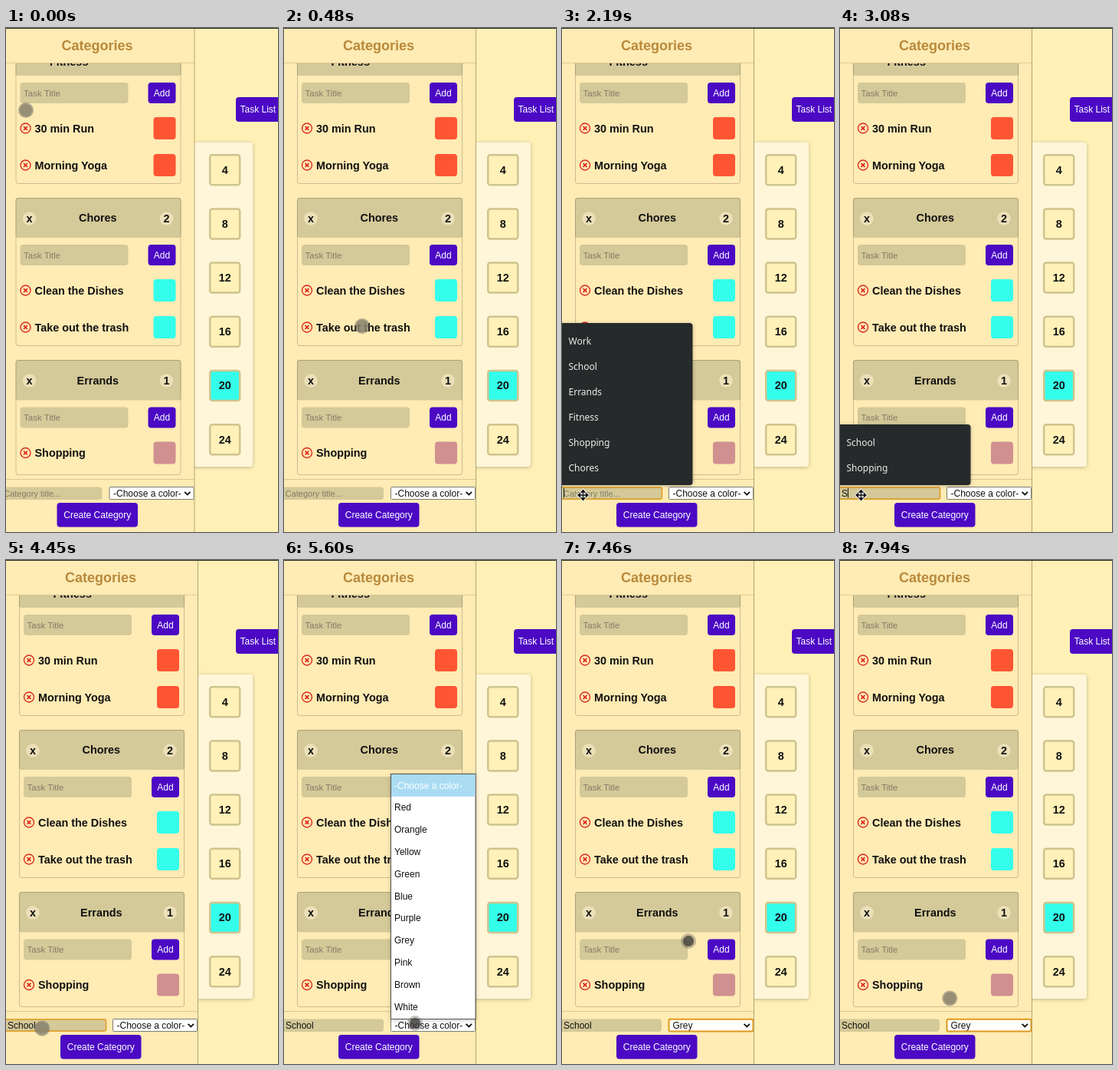
Recreate the animation shown at these times as an HTML page. Size 355 px wide and 656 px high, loop 8 s.

```html
<!DOCTYPE html>
<html lang="en">
<head>
<meta charset="utf-8">
<title>Categories</title>
<style>
  html, body { margin: 0; width: 100%; height: 100%; overflow: hidden; background: #fff0b6; }
  svg { display: block; width: 355px; height: 656px; }
  text { font: 12px "Liberation Sans", Arial, sans-serif; fill: #111; white-space: pre; }
  .bold { font-size: 14.4px; font-weight: bold; }
  .title { font-size: 18px; font-weight: bold; fill: #b8893b; }
  .light { fill: #fff; }
  .hint { font-size: 11.5px; fill: #827c68; }
  .small { font-size: 11px; }
  .mid { text-anchor: middle; }
  .suggest { font: 500 12px "Noto Sans", "Open Sans", sans-serif; fill: #eee; }
</style>
</head>
<body>
<svg id="stage" viewBox="0 0 355 656" xmlns="http://www.w3.org/2000/svg">
  <defs>
    <filter id="soft" x="-20%" y="-20%" width="140%" height="140%">
      <feDropShadow dx="0" dy="1" stdDeviation="2.5" flood-color="#000" flood-opacity=".25"/>
    </filter>
  </defs>
</svg>
<script>
const LOOP = 8000;
const TAN = '#d4c998', PANEL = '#ffebb4', VIOLET = '#4b09c4', CYAN = '#33ffea', FOCUS = '#e09a1c';
const stage = document.getElementById('stage');

function add(parent, tag, attrs, content) {
  const el = document.createElementNS('http://www.w3.org/2000/svg', tag);
  for (const k in attrs) el.setAttribute(k, attrs[k]);
  if (content !== undefined) el.textContent = content;
  parent.appendChild(el);
  return el;
}
const group = (parent, attrs) => add(parent, 'g', attrs || {});
const box = (parent, x, y, width, height, fill, rx = 0, extra = {}) =>
  add(parent, 'rect', { x, y, width, height, fill, rx, ...extra });
const label = (parent, x, y, content, cls = '') =>
  add(parent, 'text', { x, y, class: cls }, content);
const show = (el, on) => el.setAttribute('visibility', on ? 'visible' : 'hidden');

function button(parent, x, y, w, h, content) {
  box(parent, x, y, w, h, VIOLET, 4);
  label(parent, x + w / 2, y + h / 2 + 4.3, content, 'light mid');
}

// Page behind the panel
box(stage, 0, 0, 355, 656, '#fff0b6');
box(stage, 200, 149, 122, 422, '#fff6d9', 4, { filter: 'url(#soft)' });
for (let i = 0; i < 6; i++) {
  const y = 164 + i * 70.2, hour = 4 + i * 4;
  box(stage, 266.2, y + 1.2, 39, 39, hour === 20 ? CYAN : '#fff1b8', 3,
    { stroke: '#cfc48e', 'stroke-width': 2.5 });
  label(stage, 285.7, y + 25.5, hour, 'bold mid');
}
box(stage, 300, 90, 70, 32, VIOLET, 4);
label(stage, 305.5, 110.3, 'Task List', 'light');

// Sliding panel
const panel = group(stage);
box(panel, -10, 0, 260, 656, PANEL);

function badge(x, y, content) {
  add(panel, 'circle', { cx: x, cy: y, r: 8.8, fill: '#ebe0b8' });
  label(panel, x, y + 5, content, 'bold mid');
}

function card(top, headEnd, name, nameX, nameY, tasks, color) {
  const bottom = headEnd + 45 + tasks.length * 48 + (tasks.length === 2 ? 0 : 4.5);
  box(panel, 17, top, 216, headEnd - top, TAN, 3);
  box(panel, 17.5, top + .5, 215, bottom - top - 1, 'none', 3, { stroke: '#000', 'stroke-opacity': .2 });
  label(panel, nameX, nameY, name, 'bold mid');
  box(panel, 23, headEnd + 9, 141, 27, TAN, 4);
  label(panel, 27.5, headEnd + 26.7, 'Task Title', 'hint');
  button(panel, 190, headEnd + 9, 36, 27, 'Add');
  tasks.forEach((task, i) => {
    const y = headEnd + 68.5 + i * 48;
    const icon = group(panel, { transform: `translate(30 ${y})`, fill: 'none', stroke: '#dc2a1c', 'stroke-width': 1.4 });
    add(icon, 'circle', { r: 6.5 });
    add(icon, 'path', { d: 'M-2.4 -2.4L2.4 2.4M2.4 -2.4L-2.4 2.4', 'stroke-width': 1.7 });
    label(panel, 42, y + 5, task, 'bold');
    box(panel, 197, y - 14.5, 29, 29, color, 4);
  });
}

card(20, 62, 'Fitness', 86.7, 48.5, ['30 min Run', 'Morning Yoga'], '#ff5533');
card(221, 273, 'Chores', 124.3, 252.3, ['Clean the Dishes', 'Take out the trash'], CYAN);
card(432, 484.5, 'Errands', 124.3, 463.5, ['Shopping'], '#d09090');
[[248, 2], [459, 1]].forEach(([y, n]) => { badge(35, y, 'x'); badge(214, y, n); });

box(panel, -10, 0, 260, 45, PANEL);
box(panel, -10, 45, 260, 1, '#e0cc94');
label(panel, 123.5, 29, 'Categories', 'title mid');
box(panel, -10, 587, 260, 1, '#d9c791');

const field = box(panel, -10, 597.5, 140, 16.5, TAN, 4);
const fieldRing = box(panel, -10, 598, 140.5, 15, 'none', 2, { stroke: FOCUS, 'stroke-width': 1.5 });
const hint = label(panel, 1.7, 609.5, 'Category title...', 'hint small');
const typed = label(panel, 2, 609.5, '');
const caret = box(panel, 2, 599, 1, 12.5, '#111');

box(panel, 139.5, 597.5, 110, 16, '#fff', 1, { stroke: '#7d7a70' });
const choice = label(panel, 144.5, 609.8, '');
add(panel, 'path', { d: 'M237.6 603.8l3.7 3.7l3.7 -3.7', fill: 'none', stroke: '#111', 'stroke-width': 1.8 });
const choiceRing = box(panel, 139.5, 597.8, 110, 15.6, 'none', 2, { stroke: FOCUS, 'stroke-width': 2 });
button(panel, 71, 618, 105.5, 31.5, 'Create Category');
box(panel, 250, 0, 1, 656, '#b5a46f');
box(stage, 0, 0, 355, 1, '#2a2820');

// Autofill suggestions
const history = ['Work', 'School', 'Errands', 'Fitness', 'Shopping', 'Chores'];
const hints = group(stage);
const hintsBox = box(hints, -8, 0, 178.5, 0, '#28292b', 4, { filter: 'url(#soft)' });
const hintRows = history.map(() => label(hints, 8.5, 0, '', 'suggest'));

function drawHints(text) {
  const found = history.filter(w => w.startsWith(text));
  const height = 13 + 33 * found.length;
  const top = found.length > 1 ? 595 - height : 614;
  hintsBox.setAttribute('y', top);
  hintsBox.setAttribute('height', height);
  hintRows.forEach((row, i) => {
    row.textContent = found[i] || '';
    row.setAttribute('y', top + 27.5 + 33 * i);
  });
}

// Colour list
const list = group(stage);
box(list, 139.5, 278.5, 110.5, 319, '#fff', 0, { stroke: '#555', filter: 'url(#soft)' });
box(list, 140, 279, 109.5, 28.8, '#a9dcf3');
['-Choose a color-', 'Red', 'Orangle', 'Yellow', 'Green', 'Blue', 'Purple', 'Grey', 'Pink', 'Brown', 'White']
  .forEach((name, i) => label(list, 144, 297.6 + i * 28.8, name, i ? '' : 'light'));

// Pointer: a round dot, or a four-way arrow over the text field
const pointer = group(stage);
const dot = group(pointer);
const halo = add(dot, 'circle', { r: 10, fill: '#555' });
const core = add(dot, 'circle', { r: 8, fill: '#666' });
const cross = group(pointer);
const arrows = 'M-4 0H4M0 -4V4M-6.5 0l2.5 -2.3v4.6zM6.5 0l-2.5 -2.3v4.6zM0 -6.5l-2.3 2.5h4.6zM0 6.5l-2.3 -2.5h4.6z';
add(cross, 'path', { d: arrows, fill: '#fff', stroke: '#fff', 'stroke-width': 3 });
add(cross, 'path', { d: arrows, fill: '#111', stroke: '#111', 'stroke-width': 1.3 });

const within = (t, a, b) => t >= a && t < b;
const mix = (a, b, p) => a + (b - a) * p;

// Progress 0..1 made of n jumps, the first at a and the last at b
function jumps(t, a, b, n) {
  if (t < a) return 0;
  if (t >= b) return 1;
  return (Math.floor((t - a) / (b - a) * (n - 1) + 1e-6) + 1) / n;
}

function pointerAt(t) {
  if (t < 1050) {
    const p = jumps(t, 90, 480, 5);
    return [mix(26, 102, p), mix(107, 388, p)];
  }
  if (t < 4450) {
    const p = jumps(t, 1050, 1810, 9), e = p * p * (3 - 2 * p);
    return [mix(102, 27.5, e), mix(388, 608, e)];
  }
  if (t < 6510) {
    const p = jumps(t, 4450, 5110, 8);
    return [mix(28, 171, p) + 3 * Math.sin(Math.PI * p), mix(608, 603, p) + 6 * Math.sin(Math.PI * p)];
  }
  if (t < 7540) {
    const p = jumps(t, 6510, 7260, 9);
    return [mix(171, 165, p) + 6 * Math.sin(Math.PI * p), mix(603, 496, 1 - (1 - p) ** 2)];
  }
  if (t < 7850) return [156, 487];
  return t < 7940 ? [149, 532] : [143.3, 570.5];
}

const keyTimes = [3080, 3180, 3470, 3560, 3760, 3960];

function render(t) {
  const slide = t < 90 ? -4.5 : t < 190 ? -1 : 0;
  panel.setAttribute('transform', `translate(${slide} 0)`);

  const text = 'School'.slice(0, keyTimes.filter(k => t >= k).length);
  const focused = within(t, 2190, 5600);
  typed.textContent = text;
  show(hint, !text);
  show(fieldRing, focused);
  caret.setAttribute('x', text ? 2 + typed.getComputedTextLength() : 2);
  show(caret, within(t, 2190, 2700) || within(t, 3080, 4450) || within(t, 4950, 5420));

  drawHints(text);
  hints.setAttribute('display', within(t, 2190, 3960) ? 'inline' : 'none');
  list.setAttribute('display', within(t, 5600, 7460) ? 'inline' : 'none');
  choice.textContent = t < 7460 ? '-Choose a color-' : 'Grey';
  show(choiceRing, t >= 7460);

  const [x, y] = pointerAt(t);
  const pressed = within(t, 1900, 2190) || within(t, 5600, 5700) || within(t, 7460, 7540);
  const arrow = within(t, 2190, 4450);
  pointer.setAttribute('transform', `translate(${x} ${y})`);
  show(dot, !arrow);
  show(cross, arrow);
  halo.setAttribute('opacity', pressed ? .35 : .45);
  core.setAttribute('fill', pressed ? '#3c3a36' : '#8f8870');
  core.setAttribute('opacity', pressed ? .75 : .8);
  core.setAttribute('r', pressed ? 7 : 8);
}

const start = performance.now();
function tick() {
  render((performance.now() - start) % LOOP);
  requestAnimationFrame(tick);
}
tick();
</script>
</body>
</html>
```
